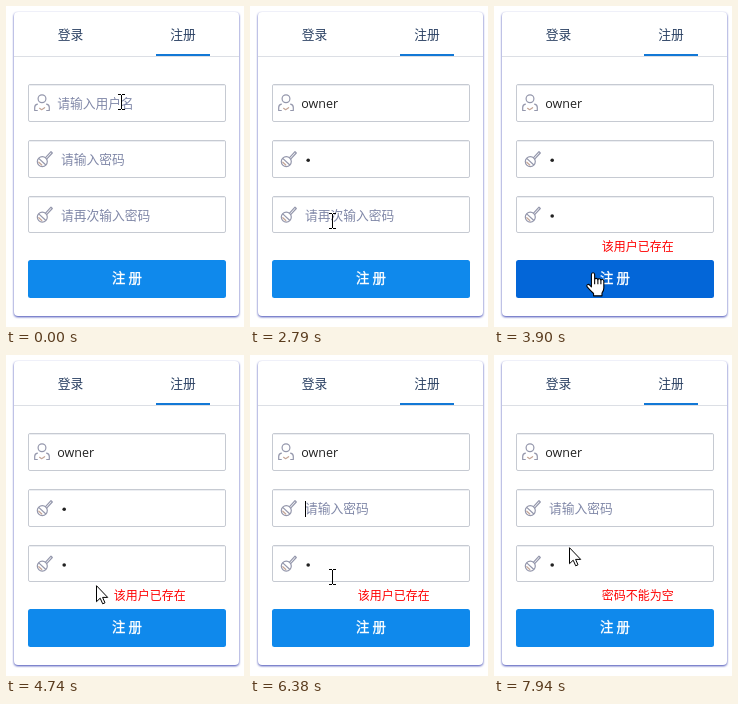
Recreate the animation shown at these times as an HTML page. Size 238x321 px, loop 8000 ms.

```html
<!DOCTYPE html>
<html lang="zh-CN">
<head>
<meta charset="utf-8">
<style>
html, body { margin: 0; width: 100%; height: 100%; overflow: hidden; background: #fff; }
svg { display: block; width: 238px; height: 321px; }
text { font: 12.75px "Noto Sans CJK SC", "Noto Sans CJK", "Noto Sans CJK JP", sans-serif; }
.card { fill: #fff; filter: drop-shadow(0 1px .9px #3f48b4); }
.tab { fill: #2b4163; text-anchor: middle; }
.hint { fill: #8088a8; }
.name { font: 12.5px "Open Sans", "Noto Sans", sans-serif; fill: #222; }
.error { font-size: 12px; fill: #f00; }
.send { font-size: 13.4px; fill: #fff; stroke: #fff; stroke-width: .35; text-anchor: middle; }
.box { fill: #fff; stroke: #c6cad2; }
.icon { fill: none; stroke: #9497ac; stroke-width: 1.2; stroke-linecap: round; stroke-linejoin: round; }
.accent { stroke: #c4a596; }
.outlined { fill: #fff; stroke: #000; stroke-linejoin: round; }
</style>
</head>
<body>
<svg viewBox="0 0 238 321">
  <defs>
    <g id="field">
      <rect class="box" x="22.5" y=".5" width="197" height="37" rx="1.5"/>
      <path d="M23 1.5H219" stroke="#eceef2"/>
    </g>
    <g id="key" class="icon">
      <circle cx="36.300" cy="21.600" r="5"/>
      <path d="M39.500 17.600L45 11.600l1.300 1.400-5.400 5.800M33 18.600l6.600 6.200"/>
      <path class="accent" d="M32.800 22.200l3 2.800"/>
    </g>
  </defs>
  <rect class="card" x="8" y="6" width="225" height="304" rx="4"/>
  <path d="M8 50.5H233" stroke="#dcdfe5"/>
  <path d="M150 49H204" stroke="#1278d6" stroke-width="2"/>
  <text class="tab" x="64.5" y="32.5">登录</text>
  <text class="tab" x="177" y="32.5">注册</text>

  <use href="#field" y="78"/>
  <use href="#field" y="134"/>
  <rect class="box" x="22.5" y="190.5" width="197" height="36" rx="1.5"/>
  <path d="M23 191.5H219" stroke="#eceef2"/>
  <g class="icon">
    <circle cx="36" cy="92.800" r="3.900"/>
    <path d="M31.300 104.500H28.700v-3q0-2.700 2.700-3.300M40.700 104.500h2.600v-3q0-2.700-2.700-3.300"/>
    <path class="accent" d="M33.600 102.300l2 1.400 3-2"/>
  </g>
  <use href="#key" y="134"/>
  <use href="#key" y="189.5"/>

  <rect id="mark" x="55" y="145" width="6" height="16" fill="#3390ff"/>
  <text id="hint1" class="hint" x="51.3" y="101.800">请输入用户名</text>
  <text id="hint2" class="hint" x="55" y="157.800">请输入密码</text>
  <text id="hint3" class="hint" x="55" y="213.500">请再次输入密码</text>
  <text id="name" class="name" x="51.3" y="102"></text>
  <circle id="dot2" cx="58.2" cy="154.3" r="1.8"/>
  <circle id="dot3" cx="58.2" cy="210" r="1.8" fill="#222"/>
  <rect id="caret" width="1" height="16"/>

  <text id="error" class="error" x="107.7" y="245"></text>
  <rect id="button" x="22" y="254" width="198" height="38" rx="2.5"/>
  <text class="send" x="121" y="276.600">注 册</text>

  <g id="beam"><path d="M-3 .5H0M1 .5H4M.5 1V15M-3 15.5H0M1 15.5H4" stroke="#000"/></g>
  <g id="arrow"><path class="outlined" d="M.5 .7v16l3.7-3.5 2.5 5.6 2.3-1-2.4-5.4h5.1z"/></g>
  <g id="hand"><g transform="scale(1.08 1.06)">
    <path class="outlined" d="M5 14V2.6q0-1.9 1.5-1.9T8 2.6V7q.3-1 1.5-1t1.5 1.4q.3-1 1.4-1t1.4 1.5q.4-.8 1.3-.8 1.400 0 1.400 1.700v6.200q0 2.600-1.700 4.800v2.700H7v-2.200Q4.600 18.200 1.300 14.300.2 12.700 1.400 11.900q1.100-.7 2.300.7z"/>
    <path d="M8 7v4.500M11 7.500v4M13.800 8v3.500" stroke="#000" fill="none"/>
  </g></g>
</svg>
<script>
const LOOP = 8000, USER = "owner";
const el = {};
document.querySelectorAll("svg > [id]").forEach(n => el[n.id] = n);

const point = (kind, x, y) => ({ cursor: { kind, x, y } });
const beam = (x, y) => point("beam", x, y);
const arrow = (x, y) => point("arrow", x, y);
const hand = (x, y) => point("hand", x, y);
const hidden = { cursor: null };
// caret: field number, 0 when not drawn
const start = { typed: 0, dot2: false, dot3: false, mark: false, caret: 0, hover: false, error: "", ...beam(115, 88) };

const steps = [
  [80, { caret: 1 }],
  [540, { typed: 1 }],
  [620, hidden],
  [770, { typed: 2 }],
  [860, { typed: 3 }],
  [1010, { typed: 5 }],
  [1470, { caret: 0, ...beam(115, 88) }],
  [1550, beam(111, 104)],
  [1630, arrow(105, 126)],
  [1710, beam(100, 147)],
  [1860, { caret: 2 }],
  [1940, { dot2: true, ...hidden }],
  [2020, beam(97, 151)],
  [2100, arrow(88, 177)],
  [2170, beam(82, 205)],
  [2250, { caret: 3, ...beam(82, 211) }],
  [2650, beam(82, 209)],
  [2720, { caret: 0 }],
  [2790, beam(82, 207)],
  [2870, { dot3: true, caret: 3, ...hidden }],
  [3020, beam(82, 200)],
  [3100, arrow(82, 176)],
  [3180, arrow(84, 181)],
  [3260, beam(87, 198)],
  [3340, { caret: 0, ...beam(90, 208) }],
  [3420, arrow(93, 232)],
  [3500, { hover: true, ...hand(90, 255) }],
  [3580, hand(91, 260)],
  [3650, hand(92, 264)],
  [3730, hand(92, 266)],
  [3900, { error: "该用户已存在" }],
  [4740, { hover: false, ...arrow(90, 230) }],
  [4820, beam(83, 148)],
  [5140, { caret: 2 }],
  [5220, { caret: 0, mark: true, ...beam(74, 147) }],
  [5300, beam(64, 147)],
  [5380, hidden],
  [5530, arrow(6, 167)],
  [5610, arrow(38, 179)],
  [5690, arrow(64, 186)],
  [5840, arrow(61, 183)],
  [5920, arrow(58, 181)],
  [6300, { mark: false, dot2: false, caret: 2 }],
  [6380, beam(82, 214)],
  [6450, { hover: true, ...hand(103, 256) }],
  [6530, hand(107, 261)],
  [6760, { caret: 0 }],
  [7160, hand(106, 261)],
  [7230, { error: "密码不能为空" }],
  [7710, hand(100, 256)],
  [7790, { hover: false, ...arrow(90, 230) }],
  [7860, beam(81, 206)],
  [7940, arrow(75, 192)]
];

const show = (node, on) => node.setAttribute("display", on ? "inline" : "none");

function stateAt(t) {
  const state = { ...start };
  for (const [time, change] of steps) if (time <= t) Object.assign(state, change);
  return state;
}

function caretX(s) {
  if (s.caret === 1) return s.typed ? Math.round(51 + el.name.getComputedTextLength()) : 51;
  return (s.caret === 2 ? s.dot2 : s.dot3) ? 61 : 55;
}

function draw(t) {
  const s = stateAt(t);
  el.name.textContent = USER.slice(0, s.typed);
  el.error.textContent = s.error;
  show(el.hint1, !s.typed);
  show(el.hint2, !s.dot2);
  show(el.hint3, !s.dot3);
  show(el.dot2, s.dot2);
  show(el.dot3, s.dot3);
  show(el.mark, s.mark);
  el.dot2.setAttribute("fill", s.mark ? "#fff" : "#222");
  el.button.setAttribute("fill", s.hover ? "#0366d8" : "#0f89ec");
  show(el.caret, s.caret);
  if (s.caret) {
    el.caret.setAttribute("x", caretX(s));
    el.caret.setAttribute("y", 34 + 56 * s.caret);
  }
  for (const kind of ["beam", "arrow", "hand"]) {
    const on = s.cursor && s.cursor.kind === kind;
    show(el[kind], on);
    if (on) el[kind].setAttribute("transform", `translate(${s.cursor.x} ${s.cursor.y})`);
  }
}

const origin = performance.now();
function tick() {
  draw((performance.now() - origin) % LOOP);
  requestAnimationFrame(tick);
}
tick();
</script>
</body>
</html>
```
